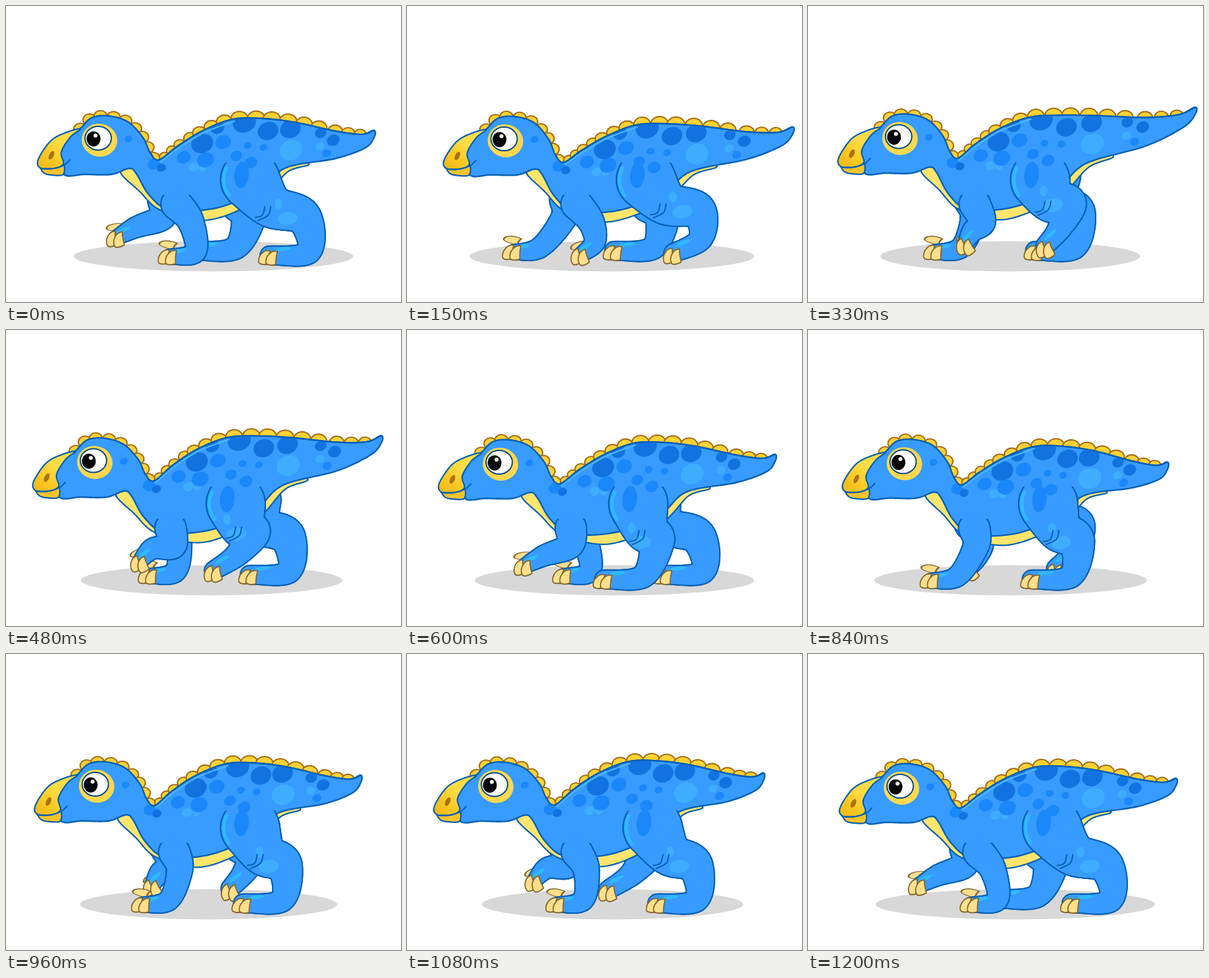
An HTML page with a canvas that plays this animation: 600 px wide and 450 px high, repeating every 1.23 s.

```html
<!DOCTYPE html>
<html lang="en">
<head>
<meta charset="utf-8">
<title>Walking dinosaur</title>
<style>
html, body { margin: 0; width: 100%; height: 100%; overflow: hidden; background: #fff; }
canvas { display: block; width: 600px; height: 450px; }
</style>
</head>
<body>
<canvas id="stage" width="600" height="450"></canvas>
<script>
const ctx = document.getElementById('stage').getContext('2d');
const LOOP = 1230, CYCLE = 1200, STEP = 30;
const BLUE = '#389bff', LINE = '#0560b4', GLOW = '#2fbaff', PALE = '#3fadff', MID = '#1a88fa', DARK = '#1273e0';
const GOLD = '#ffd236', BROWN = '#a66b12', CREAM = '#ffe56c', CLAW = '#ffdf8c';

// Key points of the resting pose.
const RIDGE = [
  [113, 186], [130, 170], [155, 167], [185, 176], [208, 200], [219, 223], [232, 234], [262, 212],
  [300, 189], [345, 172], [390, 171], [440, 177], [500, 190], [540, 195], [559, 189]
];
const UNDERSIDE = [
  [559, 200], [545, 216], [500, 232], [425, 246], [385, 280], [320, 307], [250, 310], [218, 288],
  [198, 255], [187, 247], [160, 256], [120, 256], [88, 256], [84, 222], [100, 193]
];
const BELLY = [
  [174, 253], [202, 281], [232, 309], [285, 325], [330, 320], [390, 291], [428, 252], [460, 239],
  [400, 220], [250, 270], [195, 245]
];
const BEAK = [
  [113, 187], [92, 192], [68, 205], [49, 233], [52, 246], [72, 247], [87, 240], [84, 222], [98, 199]
];
const JAW = [[54, 246], [58, 254], [70, 257], [87, 256], [87, 240], [72, 245]];
const SMILE = [[52, 247], [72, 247], [88, 242], [97, 234]];
// Spot centres with their size.
const SPOTS = {
  [PALE]: [[433, 219, 18], [285, 245, 8], [299, 246, 6], [477, 213, 7]],
  [MID]: [
    [225, 240, 10], [270, 230, 11], [303, 234, 13], [330, 207, 12], [350, 228, 9], [372, 238, 10],
    [391, 215, 6], [367, 212, 6], [487, 224, 7], [186, 202, 6]
  ],
  [DARK]: [
    [298, 209, 17], [398, 190, 16], [362, 177, 18], [432, 187, 16], [321, 185, 11], [478, 193, 9],
    [497, 204, 10], [236, 246, 7]
  ]
};

const { sin, cos, PI } = Math;
const clamp = v => Math.max(0, Math.min(1, v));
const lerp = (a, b, u) => a + (b - a) * u;
const smooth = u => u * u * (3 - 2 * u);

// Dense Catmull-Rom samples; works for points of any dimension.
function spline(points, closed = false, steps = 14) {
  const n = points.length, out = [];
  const at = k => closed ? points[(k + n) % n] : points[Math.max(0, Math.min(n - 1, k))];
  for (let i = 0; i < (closed ? n : n - 1); i++) {
    const [a, b, c, d] = [at(i - 1), at(i), at(i + 1), at(i + 2)];
    for (let k = 0; k <= steps; k++) {
      const u = k / steps;
      out.push(b.map((q, j) => q + 0.5 * u * (c[j] - a[j] + u * (2 * a[j] - 5 * q + 4 * c[j] - d[j]
        + u * (3 * (q - c[j]) + d[j] - a[j])))));
    }
  }
  return out;
}

function curve(points, closed = true) {
  const path = new Path2D();
  spline(points, closed).forEach(([x, y]) => path.lineTo(x, y));
  if (closed) path.closePath();
  return path;
}

function paint(path, fill, stroke, width = 2.2) {
  if (fill) { ctx.fillStyle = fill; ctx.fill(path); }
  if (stroke) { ctx.strokeStyle = stroke; ctx.lineWidth = width; ctx.stroke(path); }
}

function oval(x, y, rx, ry, fill, { stroke, width, turn = 0 } = {}) {
  const path = new Path2D();
  path.ellipse(x, y, rx, ry, turn, 0, PI * 2);
  paint(path, fill, stroke, width);
}

// Body bob twice per cycle; the tail also swings once per cycle.
function makeWarp(angle) {
  const swing = sin(angle), bob = sin(2 * angle), sag = 1 - cos(2 * angle);
  return ([x, y]) => {
    const trunk = smooth(clamp((x - 180) / 120));
    const tail = Math.pow(Math.max(0, (x - 330) / 228), 2);
    const low = 1 - 0.7 * clamp((y - 220) / 100);
    const dx = lerp(7.5 * bob, 6 * bob - 3.5 * sag, trunk) + tail * (24 * swing + 7 * sag);
    const dy = lerp(2 * bob - sag, 9 * bob, trunk) + tail * (5 * bob - 7 * sag - 17 * swing);
    return [x + dx, y + low * dy];
  };
}

// Foot path: carried back on the ground, then lifted, tilted and swung forward.
function footfall(time, { liftoff, landing, front, back, ground, lift, length, rest, tilt, skew }) {
  const t = (time - liftoff + 2 * CYCLE) % CYCLE, air = landing - liftoff;
  const s = clamp(t / air);
  const planted = Math.max(0, t - air) / (CYCLE - air);
  const x = t < air ? lerp(back, front, smooth(Math.pow(s, 1.1))) : lerp(front, back, planted);
  const bend = sin(PI * Math.pow(s, skew));
  const y = ground - lift * sin(PI * Math.pow(s, 1.5));
  const reach = length * (1 - 0.43 * bend), turn = rest + tilt * bend;
  return { toe: [x, y], ankle: [x + reach * cos(turn), y - reach * sin(turn)], bend };
}

const HIND = {
  liftoff: 60, landing: 600, front: 299, back: 410, ground: 379, lift: 16,
  length: 60, rest: 0.08, tilt: 0.8, skew: 1
};
const FORE = {
  liftoff: 100, landing: 720, front: 166, back: 264, ground: 381, lift: 28,
  length: 41, rest: 0.16, tilt: 0.9, skew: 0.6
};

// Joints are [x, y, radius] from the body down to the toes.
function hindLeg(time, hipShift = 0) {
  const { toe, ankle, bend } = footfall(time, HIND);
  const hipX = 361 + 12 * cos(2 * PI * (time / CYCLE + 0.1));
  const hockX = 0.72 * ankle[0] + 121;
  return [
    [hipX + hipShift, 264, hipShift ? 30 : 45],
    [lerp(hipX, hockX, 0.4), 304 - 8 * bend, hipShift ? 28 : 33],
    [hockX, 321 - 20 * bend, 27], [...ankle, 18], [...toe, 14]
  ];
}

function foreLeg(time) {
  const { toe, ankle } = footfall(time, FORE);
  const shoulderX = 254 + 5 * cos(2 * PI * time / CYCLE);
  return [[shoulderX, 301, 24], [0.42 * ankle[0] + 160, 328, 20], [...ankle, 16], [...toe, 11]];
}

function claw(x, y, turn, wide = 1.15, tall = 1.25) {
  ctx.save();
  ctx.translate(x, y);
  ctx.rotate(turn);
  ctx.scale(wide, tall);
  paint(new Path2D('M2-8C-7-10-14-1-13 6C-12 10-3 9 0 8C0 3 0-3 2-8Z'), CLAW, '#80642c', 1.5);
  ctx.restore();
}

function limb(joints, { fore = false, far = false } = {}) {
  const [ankle, toe] = joints.slice(-2);
  const turn = 0.7 * (Math.atan2(ankle[1] - toe[1], ankle[0] - toe[0]) + 0.12);
  const discs = spline(joints, false, 18);
  const fillDiscs = (grow, color) => discs.forEach(([x, y, r]) => oval(x, y, r + grow, r + grow, color));

  if (fore) claw(toe[0] + 8, toe[1] - 16, turn + 0.35, 1.7, 0.7);
  ctx.save();
  if (!far) {
    // Only the lower part is outlined, so the top melts into the body.
    ctx.beginPath();
    ctx.rect(0, joints[0][1] - (fore ? 14 : 26), 600, 450);
    ctx.clip();
  }
  fillDiscs(1, LINE);
  ctx.restore();
  fillDiscs(-1.2, BLUE);

  const shine = toe[2] * 0.55;
  oval(lerp(ankle[0], toe[0], 0.65), lerp(ankle[1], toe[1], 0.65) - shine, 12, 3, GLOW, { turn: turn - 0.15 });
  claw(toe[0] - 1, toe[1] + toe[2] - 11, turn);
  claw(toe[0] + 10, toe[1] + toe[2] - 10, turn);
}

function thighDetail([hip, knee, hock]) {
  const shine = new Path2D();
  shine.arc(hip[0], hip[1], 40, 2.5, 3.6);
  paint(shine, null, GLOW, 5);
  oval(hip[0] - 13, hip[1] - 7, 11, 20, MID, { turn: 0.1 });
  oval(hock[0] - 24, hock[1] + 2, 15, 10, PALE, { turn: -0.15 });
  oval(hock[0] - 38, hock[1] - 20, 6, 8, PALE);
  const [x, y] = knee;
  for (const k of [0, 9]) {
    paint(curve([[x - 1 - k, y + 1], [x - 5 - k, y + 14], [x - 20 - k / 2, y + 22 - k / 2]], false), null, LINE, 2);
  }
}

// Scallops walk along the ridge, each spaced by its own size.
function crest(warp) {
  let gap = 0, last = RIDGE[0];
  for (const point of spline(RIDGE)) {
    gap -= Math.hypot(point[0] - last[0], point[1] - last[1]);
    last = point;
    if (gap > 0 || point[0] > 545) continue;
    const r = point[0] < 240 ? 10 : 8 + 5.5 * sin(PI * (point[0] - 240) / 330);
    const [x, y] = warp([point[0], point[1] + 1]);
    oval(x, y, r, r * 0.88, GOLD, { stroke: BROWN, width: 2 });
    gap += 1.85 * r;
  }
}

function face(shape, warp) {
  const [bx, by] = warp([49, 248]);
  const tone = ctx.createLinearGradient(bx, by, bx + 32, by - 38);
  tone.addColorStop(0, '#eeb516');
  tone.addColorStop(0.6, '#fdcb26');
  tone.addColorStop(1, '#ffdc45');
  paint(shape(JAW), '#f8c32b', LINE);
  paint(shape(BEAK), tone, LINE);
  oval(...warp([69, 227]), 3.5, 7, '#a97312', { turn: 0.45 });
  paint(shape(SMILE, false), null, LINE, 2);

  const [x, y] = warp([140, 201]);
  oval(x + 2, y + 3, 27, 25, '#ffd84e', { turn: 0.2 });
  oval(x, y, 20, 18, '#fff', { stroke: '#084a8c', width: 2 });
  oval(x - 7, y + 1, 10.5, 11.5, '#050505');
  oval(x - 4, y - 4, 3, 3, '#fff');
}

function draw(time) {
  const angle = 2 * PI * time / CYCLE, bob = sin(2 * angle), beat = cos(2 * angle);
  const warp = makeWarp(angle);
  const shape = (points, closed) => curve(points.map(warp), closed);
  const farther = joints => joints.map(([x, y, r]) => [x - 10, y - 7, r]);
  ctx.fillStyle = '#fff';
  ctx.fillRect(0, 0, 600, 450);
  ctx.lineJoin = ctx.lineCap = 'round';
  oval(311 + 4 * beat, 380.5, 206 + 6 * beat + 10 * bob, 23, '#d8d8d8');

  const opposite = time + CYCLE / 2;
  limb(farther(hindLeg(opposite, 25)), { far: true });
  limb(farther(foreLeg(opposite)), { far: true, fore: true });
  crest(warp);
  paint(shape(BELLY), CREAM, LINE);
  const body = shape(RIDGE.concat(UNDERSIDE));
  paint(body, BLUE, LINE, 2.4);

  const hind = hindLeg(time);
  limb(hind);
  ctx.save();
  ctx.clip(body);
  for (const [color, spots] of Object.entries(SPOTS)) {
    for (const [x, y, r] of spots) oval(...warp([x, y]), r, r * 0.85, color, { turn: -0.4 });
  }
  paint(shape(RIDGE.slice(6, 10).map(([x, y]) => [x + 2, y + 3]), false), null, '#4fb9ff', 2);
  ctx.restore();
  paint(shape(RIDGE.slice(5), false), null, LINE);
  thighDetail(hind);
  limb(foreLeg(time), { fore: true });
  face(shape, warp);
}

function tick() {
  draw(Math.floor(performance.now() % LOOP / STEP) * STEP);
  requestAnimationFrame(tick);
}
tick();
</script>
</body>
</html>
```
